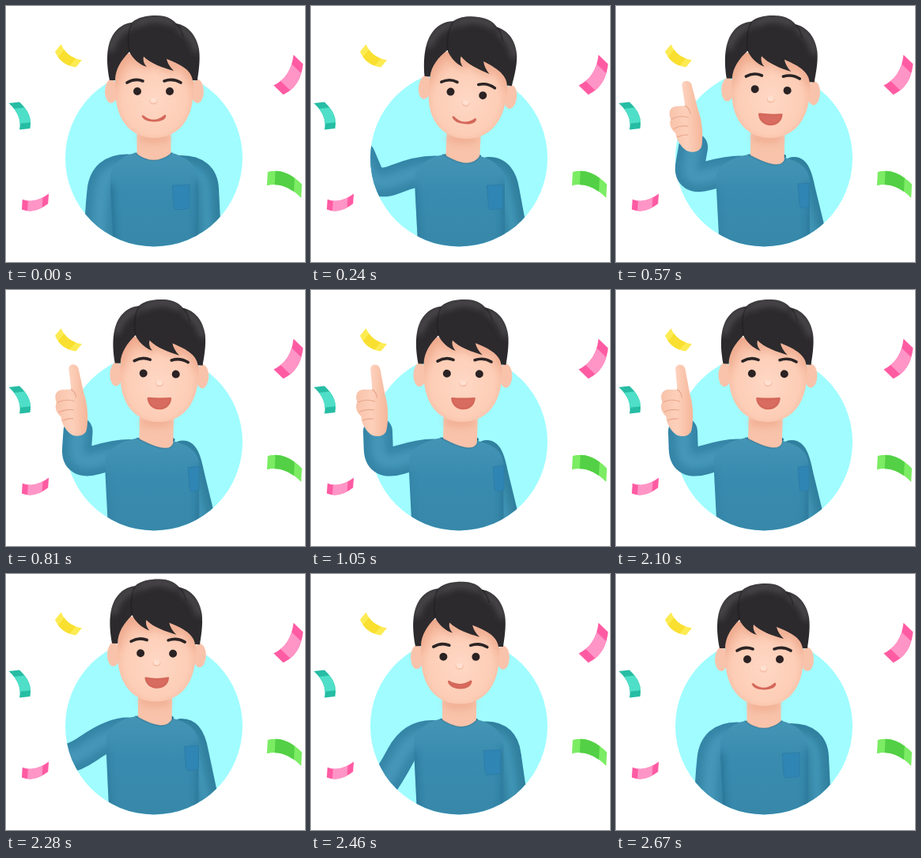
These frames come from a looping animation (378 by 324 pixels, 2.7 s). An HTML page:

```html
<!DOCTYPE html>
<html lang="en">
<head>
<meta charset="utf-8">
<title>Pointing up</title>
<style>
html, body { margin: 0; width: 100%; height: 100%; overflow: hidden; background: #fff; }
svg { display: block; width: 378px; height: 324px; }
.line { fill: none; stroke-linecap: round; stroke-linejoin: round; }
</style>
</head>
<body>
<svg viewBox="0 0 378 324">
  <defs>
    <clipPath id="disc"><circle cx="187" cy="192.5" r="112"/></clipPath>
    <clipPath id="faceClip"><use href="#face"/></clipPath>
    <clipPath id="hairClip"><use href="#hair"/></clipPath>
    <clipPath id="torsoClip"><use href="#torso"/></clipPath>
    <filter id="soft" x="0" y="0" width="378" height="324" filterUnits="userSpaceOnUse"><feGaussianBlur stdDeviation="4"/></filter>
    <linearGradient id="shirt" x1="0" y1="0" x2="0" y2="1">
      <stop offset="0" stop-color="#4494b5"/><stop offset=".4" stop-color="#398caf"/><stop offset="1" stop-color="#3787a9"/>
    </linearGradient>
    <radialGradient id="skin" cx=".5" cy=".55" r=".62">
      <stop offset="0" stop-color="#fed8c5"/><stop offset=".65" stop-color="#fdcdb6"/><stop offset="1" stop-color="#f2b094"/>
    </radialGradient>
    <linearGradient id="handSkin" x1="0" y1="0" x2="1" y2="0">
      <stop offset="0" stop-color="#f8c2a9"/><stop offset=".5" stop-color="#fdd0bb"/><stop offset="1" stop-color="#f5b699"/>
    </linearGradient>
  </defs>

  <g id="confetti"></g>
  <circle cx="187" cy="192.5" r="112" fill="#a0fcff"/>

  <g clip-path="url(#disc)">
    <path id="rightArm" class="line" stroke="#31809f" stroke-width="34"/>
    <path id="rightGlow" class="line" stroke="#4194b5" stroke-width="14" filter="url(#soft)"/>
  </g>
  <g id="leftSide">
    <path id="leftArm" class="line" stroke="#3585a7" stroke-width="37"/>
    <path id="leftGlow" class="line" stroke="#4596b8" stroke-width="18" filter="url(#soft)"/>
    <g id="hand">
      <path fill="url(#handSkin)" d="M76 103C74 94 86 93 88 101L94 133C98 145 99 165 96 178C94 188 79 188 74 182C68 176 64 168 64 161C58 156 56 148 59 143C56 135 58 128 66 127L78 127Z"/>
      <path class="line" stroke="#e8a78c" stroke-width="1.2" d="M78 127Q83 130 84 137M60 143Q70 138 81 142M62 155Q71 151 80 153M66 166Q73 163 79 164"/>
    </g>
  </g>
  <g clip-path="url(#disc)">
    <ellipse id="collar" rx="24" ry="6" fill="#22668a"/>
    <path id="neck" class="line" stroke="#f8c3aa" stroke-width="43" stroke-linecap="butt"/>
    <ellipse id="neckShade" rx="21" ry="7" fill="#ea9f82" opacity=".5" filter="url(#soft)"/>
    <path id="torso" fill="url(#shirt)"/>
    <g clip-path="url(#torsoClip)">
      <path id="leftCrease" class="line" stroke="#1f6485" stroke-width="6" filter="url(#soft)"/>
      <path id="rightCrease" class="line" stroke="#1f6485" stroke-width="6" opacity=".6" filter="url(#soft)"/>
    </g>
    <path id="rim" class="line" stroke="#2d789a" stroke-width="1.5" opacity=".7"/>
    <path id="pocket" fill="#2f85b3" stroke="#2b7ba6" stroke-width=".8"/>
  </g>

  <g id="head">
    <ellipse cx="133" cy="108" rx="8" ry="15" fill="#f9c3ab"/>
    <ellipse cx="242" cy="108" rx="8" ry="15" fill="#f9c3ab"/>
    <path id="face" fill="url(#skin)" d="M138 60L138 105C138 148 161 167 187 167C214 167 237 148 237 105L237 60Z"/>
    <g clip-path="url(#faceClip)">
      <path class="line" stroke="#e9a284" stroke-width="7" opacity=".6" filter="url(#soft)" d="M138 94C138 80 146 68 156 58Q164 72 178 77L176 66Q188 76 212 82L204 68Q228 74 236 94"/>
    </g>
    <path id="hair" fill="#2c2a2d" d="M131 94C127 74 126 52 135 37C141 27 150 22 159 21C167 14 178 12 190 12C202 12 210 16 215 22C231 25 241 38 244 55C246 70 243 85 242 94L236 94C234 82 224 75 203 67C204 72 207 77 212 82C198 78 183 73 174 64C173 68 174 73 178 77C168 74 160 66 156 58C146 68 138 80 138 94Z"/>
    <g clip-path="url(#hairClip)">
      <path class="line" stroke="#6a686b" stroke-width="8" opacity=".6" filter="url(#soft)" d="M132 54Q138 32 157 25M166 22Q188 10 210 21M220 28Q236 36 241 55"/>
      <path class="line" stroke="#19181a" stroke-width="2" opacity=".4" d="M159 22Q152 36 156 57M215 22Q221 28 224 38"/>
    </g>
    <g id="features">
      <path id="brows" class="line" stroke="#2b2425" stroke-width="3.6" d="M153 97Q163 91 173 95M200 95Q211 91 221 97"/>
      <g fill="#2b2223">
        <ellipse id="eyeL" cx="166" cy="108" rx="5"/>
        <ellipse id="eyeR" cx="207" cy="108" rx="5"/>
      </g>
      <ellipse cx="186.5" cy="120.5" rx="5" ry="4" fill="#f6b89e" opacity=".8"/>
      <ellipse cx="186.5" cy="119.5" rx="4" ry="3.2" fill="#ffe0d1"/>
      <path id="mouth" fill="#d96c60" stroke="#d4685a" stroke-width="2.6" stroke-linejoin="round"/>
    </g>
  </g>
</svg>
<script>
const LOOP = 2700, STEP = 30;
const $ = id => document.getElementById(id);
const set = (id, attrs) => { for (const k in attrs) $(id).setAttribute(k, attrs[k]); };

// Confetti: one parabolic strip, placed, turned and skewed.
function confetto(x, y, angle, length, side, skew, end, mid) {
  const sag = side * length * .14, half = length * .18;
  const band = (reach, fill) => {
    const e = reach * length / 2, y0 = sag * (1 - reach ** 2), c = 2 * sag - y0;
    return `<path fill="${fill}" d="M${-e} ${y0 - half}Q0 ${c - half} ${e} ${y0 - half}` +
      `V${y0 + half}Q0 ${c + half} ${-e} ${y0 + half}Z"/>`;
  };
  return `<g transform="translate(${x} ${y}) rotate(${angle}) skewX(${skew})">${band(1, end) + band(.56, mid)}</g>`;
}
$('confetti').innerHTML =
  confetto(79, 63, 37, 33, 1, -3, '#fdeb52', '#f9df30') +
  confetto(357, 87, 123, 46, -1, -11, '#ff5ba3', '#ff95c6') +
  confetto(17, 139, 68, 36, -1, -16, '#26bda4', '#4fdfc8') +
  confetto(37, 247.5, -12, 34, 1, -16, '#ff5ba3', '#ff95c6') +
  confetto(352, 226.5, 20, 46, -1, 17, '#7bec63', '#53d045');

// Key poses: head offset and tilt, gaze, mouth, collar centre, raised amount, elbow and forearm angle.
const rest  = { hx: 0, hy: 0, tilt: 0, gaze: 0, open: 0, cx: 187, ny: 186, up: 0, ex: 118, ey: 262, bend: 90 };
const lean  = { hx: 11.5, hy: 1, tilt: 6.5, gaze: 2, open: 0, cx: 191, ny: 188, up: .5, ex: 80, ey: 230, bend: 247 };
const raise = { hx: 8.5, hy: 0, tilt: 2.5, gaze: -2, open: 1, cx: 191, ny: 188, up: 1, ex: 90, ey: 222, bend: 280 };
const point = { ...raise, hx: 4.5, tilt: .7, cx: 188, ny: 187, ex: 86, ey: 223, bend: 268 };
const lower = { ...point, hx: 3, hy: -5.5, open: .85, ny: 180, up: .7, ex: 75, ey: 241, bend: 205 };
const keys = [[0, rest], [30, rest], [240, lean], [540, raise], [570, raise],
  [1050, point], [2100, point], [2280, lower], [2610, rest], [LOOP, rest]];

// Hermite curve that flattens at turning points and holds.
function slope(i, name) {
  if (i === 0 || i === keys.length - 1) return 0;
  const [p, c, q] = [keys[i - 1], keys[i], keys[i + 1]];
  const a = (c[1][name] - p[1][name]) / (c[0] - p[0]);
  const b = (q[1][name] - c[1][name]) / (q[0] - c[0]);
  return a * b > 0 ? 2 * a * b / (a + b) : 0;
}
function poseAt(time) {
  let i = 0;
  while (time >= keys[i + 1][0]) i++;
  const [t0, a] = keys[i], [t1, b] = keys[i + 1];
  const d = t1 - t0, u = (time - t0) / d, v = 1 - u;
  const pose = {};
  for (const name in rest) {
    pose[name] = a[name] * (1 + 2 * u) * v * v + b[name] * u * u * (3 - 2 * u) +
      d * (slope(i, name) * u * v * v - slope(i + 1, name) * u * u * v);
  }
  return pose;
}

function drawTorso({ cx, ny, up, hx, hy }) {
  const left = cx - 55 - 9 * up, right = 243 + (cx - 187) * .5;
  const nl = cx - 24, nr = cx + 23, nry = ny + 4 * up;
  const dip = `Q${cx + 20 * up} ${ny + 19 + 5 * up} `;
  set('torso', { d: `M${nl} ${ny}C${nl - 10} ${ny + 3} ${left + 12} ${ny + 4} ${left} ${ny + 24}` +
    `V${ny + 45}L${left + 4} 310H${right}V${ny + 34}` +
    `C${right - 1} ${ny + 16} ${right - 14} ${nry + 5} ${nr} ${nry}${dip}${nl} ${ny}Z` });
  set('rim', { d: `M${nl} ${ny}${dip}${nr} ${nry}` });
  set('leftCrease', { d: `M${left} ${ny + 42}L${left + 3} 310`, opacity: .8 - .6 * up });
  set('rightCrease', { d: `M${right} ${ny + 38}V310` });
  set('collar', { cx, cy: ny + 2 });
  set('neck', { d: `M${187 + hx * .6} ${145 + hy}L${cx} ${ny + 18}` });
  set('neckShade', { cx, cy: 167 + hy });

  const px = 221 + 16 * Math.sqrt(up), w = 11 - 4 * up * up, top = ny + 40 - 4 * up;
  set('pocket', { d: `M${px - w} ${top + 1}L${px + w} ${top}v28q0 3 -4 3L${px - w + 5} ${top + 32}q-3 -1 -3 -5Z` });
}

function drawArms({ cx, ny, up, ex, ey, bend }, raised) {
  const y = ny + 20;
  const rx = cx + 64 - 25 * up, swing = 3 + 12 * Math.sqrt(up);
  const right = `M${cx + 34} ${y}Q${rx} ${y} ${rx + swing * .35} ${y + 26}l${swing * 1.3} 80`;
  set('rightArm', { d: right });
  set('rightGlow', { d: right });

  const a = bend * Math.PI / 180, sx = cx - 63 + 13 * up;
  const hx = ex + 44 * Math.cos(a), hy = ey + 44 * Math.sin(a);
  const left = `M${cx - 34} ${y}Q${sx} ${y} ${(sx + ex) / 2} ${(y + ey) / 2}` +
    `Q${ex} ${ey} ${(ex + hx) / 2} ${(ey + hy) / 2}L${hx} ${hy}`;
  set('leftArm', { d: left });
  set('leftGlow', { d: left });
  set('hand', {
    transform: `translate(${hx} ${hy}) rotate(${(268 - bend) * .3}) translate(-85 -180)`,
    visibility: raised ? 'visible' : 'hidden'
  });
  set('leftSide', { 'clip-path': raised ? 'none' : 'url(#disc)' });
}

function drawHead({ hx, hy, tilt, gaze, open }, blink) {
  set('head', { transform: `translate(${hx} ${hy}) rotate(${tilt} 187 100)` });
  set('features', { transform: `translate(${open * 1.4} ${gaze})` });
  set('brows', { transform: `translate(${open} ${-open * 4.5})` });
  const ry = 5 * (1 - .85 * blink), low = 8 + 9 * open;
  set('eyeL', { ry });
  set('eyeR', { ry });
  set('mouth', { d: `M173 139.5Q187 ${151 - 10.5 * open} 201 139` +
    `C200 ${139 + low} ${177 - 2 * open} ${139.5 + low} 173 139.5Z` });
}

function draw(time) {
  const pose = poseAt(time);
  const blink = Math.min(1, 1.3 * Math.max(0, 1 - Math.abs(time - 1365) / 165));
  drawTorso(pose);
  drawArms(pose, time >= 330 && time < 2160);
  drawHead(pose, blink);
}

function frame(now) {
  draw(Math.floor(now % LOOP / STEP) * STEP);
  requestAnimationFrame(frame);
}
draw(0);
requestAnimationFrame(frame);
</script>
</body>
</html>
```
